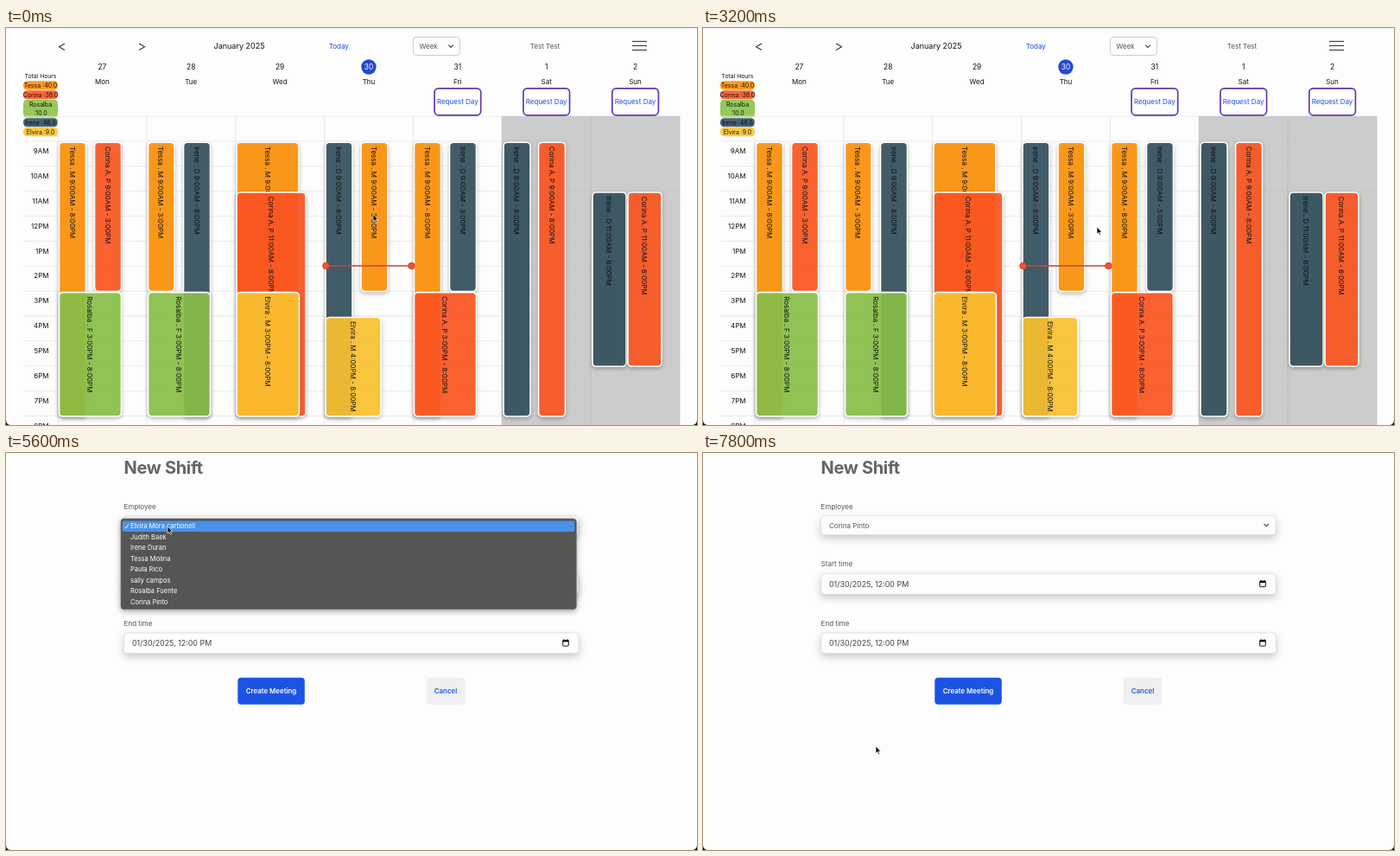
Recreate the animation shown at these times as an HTML page. Size 800 px wide and 459 px high, loop 8 s.

```html
<!DOCTYPE html>
<html lang="en">
<head>
<meta charset="utf-8">
<title>Shift calendar</title>
<style>
html, body { margin: 0; width: 100%; height: 100%; overflow: hidden; background: #fdfdfd; }
svg { display: block; width: 100%; height: 100%; font-family: Inter, "Open Sans", sans-serif; }
text { white-space: pre; }
.event { filter: drop-shadow(0 2px 2px rgba(0,0,0,.28)); }
.field { filter: drop-shadow(0 4px 4px rgba(0,0,0,.2)); }
.menu { filter: drop-shadow(0 2px 3px rgba(0,0,0,.35)); }
</style>
</head>
<body>
<svg id="stage" viewBox="0 0 800 459"></svg>
<script>
const stage = document.getElementById('stage');
const BLUE = '#1d4ed8';
const STAFF = {
  tessa: { name: 'Tessa', label: 'Tessa . M', color: '#ff9309', hours: '40.0' },
  corina: { name: 'Corina', label: 'Corina A. P', color: '#ff5722', hours: '38.0' },
  rosalba: { name: 'Rosalba', label: 'Rosalba . F', color: '#8bc34a', hours: '10.0' },
  irene: { name: 'Irene', label: 'Irene . D', color: '#34505e', hours: '46.0' },
  elvira: { name: 'Elvira', label: 'Elvira . M', color: '#ffc530', hours: '9.0' }
};
const MENU = ['Elvira Mora carbonell', 'Judith Baek', 'Irene Duran', 'Tessa Molina',
  'Paula Rico', 'sally campos', 'Rosalba Fuente', 'Corina Pinto'];
// left, width, first hour, last hour, person
const SHIFTS = [
  [61, 32, 9, 20, 'tessa'], [102, 32, 9, 15, 'corina'], [61, 73, 15, 20, 'rosalba'],
  [164, 31.5, 9, 15, 'tessa'], [205, 32, 9, 20, 'irene'], [164, 73, 15, 20, 'rosalba'],
  [266.5, 73, 9, 15, 'tessa'], [266.5, 81, 11, 20, 'corina'], [266.5, 73.5, 15, 20, 'elvira'],
  [369.5, 32, 9, 20, 'irene'], [410.5, 32, 9, 15, 'tessa'], [369.5, 65, 16, 20, 'elvira'],
  [472, 32, 9, 20, 'tessa'], [513, 32, 9, 15, 'irene'], [472, 73, 15, 20, 'corina'],
  [575.5, 32, 9, 20, 'irene'], [616, 32, 9, 20, 'corina'],
  [678.5, 40, 11, 18, 'irene'], [719.5, 40, 11, 18, 'corina']
];

const hourY = hour => 131.4 + 28.88 * (hour - 9);
const columnX = day => 60 + 102.85 * day;
const hourName = hour => (hour > 12 ? hour - 12 : hour);
const period = hour => (hour < 12 ? 'AM' : 'PM');
const clock = hour => `${hourName(hour)}:00${period(hour)}`;

const text = (x, y, value, size = 8, fill = '#111', extra = '') =>
  `<text x="${x}" y="${y}" font-size="${size}" fill="${fill}" ${extra}>${value}</text>`;
const centered = (x, y, value, size, fill, extra = '') =>
  text(x, y, value, size, fill, `text-anchor="middle" ${extra}`);
const rect = (x, y, w, h, fill, r = 0, extra = '') =>
  `<rect x="${x}" y="${y}" width="${w}" height="${h}" rx="${r}" fill="${fill}" ${extra}/>`;
const line = (x1, y1, x2, y2, color, width = 1) =>
  `<path d="M${x1} ${y1}L${x2} ${y2}" stroke="${color}" stroke-width="${width}"/>`;
const chevron = (x, y) =>
  `<path d="M${x - 2.8} ${y - 1.3}l2.8 2.8 2.8-2.8" fill="none" stroke="#444" stroke-width="1.1"/>`;

function header() {
  const arrows = [[61, 1], [161, -1]].map(([x, dir], i) =>
    `<path d="M${i ? 154 : 68} 18l${i ? 6.5 : -6.5} 3.7 ${i ? -6.5 : 6.5} 3.7" fill="none" stroke="#333" stroke-width="1.1"/>`).join('');
  const bars = [15.5, 20.5, 25.5].map(y => line(725, y, 742, y, '#444', 1.2)).join('');
  return arrows + centered(270, 24.3, 'January 2025', 9) + centered(385.3, 24, 'Today', 8, BLUE) +
    rect(471.5, 10.5, 54, 21, '#fdfdfd', 3.5, 'stroke="#ccc"') + text(478.5, 24, 'Week', 8, '#555') +
    chevron(515, 21) + centered(624, 24, 'Test Test', 8, '#555') + bars;
}

function totals() {
  let y = 61.3;
  let out = centered(40, 58.3, 'Total Hours', 6.8);
  for (const { name, color, hours } of Object.values(STAFF)) {
    const tall = name.length > 6;
    const height = tall ? 20.5 : 10.2;
    out += rect(20, y, 40, height, color, 4.5, 'fill-opacity=".9"');
    out += tall
      ? centered(40, y + 7.8, name, 7) + centered(40, y + 18.2, ':' + hours, 7)
      : centered(40, y + 7.8, `${name} :${hours}`, 7);
    y += height + .65;
  }
  return out;
}

function days() {
  const names = ['Mon', 'Tue', 'Wed', 'Thu', 'Fri', 'Sat', 'Sun'];
  const dates = [27, 28, 29, 30, 31, 1, 2];
  return names.map((name, i) => {
    const x = columnX(i) + 51.4;
    const today = i === 3;
    return (today ? `<circle cx="${x}" cy="45" r="8.7" fill="#2549d0"/>` : '') +
      centered(x, 48.1, dates[i], 8.4, today ? '#fff' : '#111') + centered(x, 65, name) +
      (i > 3 ? rect(x - 26.7, 69.8, 53.6, 31, '#fff', 4.5, 'stroke="#6337ad" stroke-width="1.7"') +
        centered(x, 88.3, 'Request Day', 8, BLUE) : '');
  }).join('');
}

function grid() {
  let out = rect(574.3, 102, 205.7, 357, '#cccccc');
  for (let hour = 8; hour <= 20; hour++) {
    const y = hourY(hour) - .4;
    out += line(20, y, 574, y, '#e6e6e6', .8) + line(574, y, 780, y, '#c5c5c5', .6);
    if (hour > 8) out += text(49.5, y + 14, hourName(hour) + period(hour), 8, '#111', 'text-anchor="end"');
  }
  for (let day = 0; day <= 7; day++)
    out += line(columnX(day), 102, columnX(day), 459, day > 4 ? '#bdbdbd' : '#e2e2e2', .8);
  return out;
}

function shift([x, width, from, to, who]) {
  const { label, color } = STAFF[who];
  const top = hourY(from);
  return `<g class="event">${rect(x + .5, top + .9, width - 1, hourY(to) - top - 1, color, 4.5,
    'fill-opacity=".9" stroke="#fff" stroke-width="1.6"')}</g>` +
    text(0, 0, `${label} ${clock(from)} - ${clock(to)}`, 8, '#111',
      `transform="translate(${x + width / 2 - 3.4} ${top + 5.5}) rotate(90)"`);
}

function nowLine() {
  const dot = x => `<circle cx="${x}" cy="275" r="3.8" fill="#f4512c" stroke="#c9402a" stroke-width=".8"/>`;
  return line(370, 275, 470, 275, '#c4473f', 1.7) + dot(370.5) + dot(469.5);
}

function form() {
  const box = (y, height) => `<g class="field">${rect(136.7, y, 526.5, height, '#fdfdfd', 3.5,
    'stroke="#dcdcdc" stroke-width=".8"')}</g>`;
  const dateField = (label, y) => text(136.6, y - 8.2, label, 8, '#555') + box(y, 23.6) +
    text(146, y + 15.4, '01/30/2025, 12:00 PM', 8.9, '#444') +
    rect(644.7, y + 8.7, 6.6, 6.4, 'none', .6, 'stroke="#111"') + rect(644.5, y + 8.2, 7, 2.2, '#111') +
    line(646, y + 7.2, 646, y + 9, '#111') + line(650, y + 7.2, 650, y + 9, '#111');
  return text(136.5, 24, 'New Shift', 20, '#636568', 'font-weight="700" letter-spacing="-.3"') +
    text(136.6, 64.6, 'Employee', 8, '#555') + box(72.6, 22) +
    text(146, 86.5, '', 8, '#555', 'id="choice"') + chevron(652.3, 83.2) +
    dateField('Start time', 139.6) + dateField('End time', 208) +
    rect(268.3, 259.8, 77.5, 31, '#1d53e3', 4) +
    centered(307, 277.9, 'Create Meeting', 7.9, '#fff', 'font-weight="600"') +
    rect(486.8, 259.8, 44.8, 31, '#eeeff1', 4) +
    centered(509, 277.9, 'Cancel', 7.9, '#1f5fe0', 'font-weight="600"');
}

function menu() {
  return `<g class="menu">${rect(133, 75.9, 527.3, 104.8, '#555554', 3.5, 'stroke="#777" stroke-width=".7"')}</g>` +
    rect(134.8, 0, 523.5, 12.5, '#4a91e9', 2, 'id="highlight"') +
    MENU.map((name, i) => text(144, 87.2 + 12.5 * i, name, 7.5, '#fff')).join('') +
    '<path d="M137.6 84.8l1.5 2 2.7-4.4" fill="none" stroke="#fff" stroke-width=".9"/>';
}

stage.innerHTML = rect(0, 0, 800, 459, '#fdfdfd') + line(0, .3, 800, .3, '#e9e9e9', .7) +
  `<g id="calendar">${header() + totals() + grid() + days() + SHIFTS.map(shift).join('') + nowLine()}</g>
   <g id="form">${form()}</g><g id="menu">${menu()}</g>
   <path d="M0 453Q0 459 6 459H0zM800 453Q800 459 794 459H800z" fill="#000"/>
   <path id="cursor" d="M0 0V8.2L1.9 6.5 3.2 9.4 4.5 8.8 3.2 6H5.8Z" fill="#000" stroke="#fff" stroke-width=".7"/>`;

const part = id => document.getElementById(id);
const [calendar, formView, menuView, choice, highlight, cursor] =
  ['calendar', 'form', 'menu', 'choice', 'highlight', 'cursor'].map(part);
const show = (node, visible) => { node.style.display = visible ? '' : 'none'; };

const LOOP = 8000, STEP = 200;
const FORM_OPENS = 3400, MENU_OPENS = 4800, BLINK = 7000, MENU_CLOSES = 7200, CHOSEN = 7400;
// time, x, y
const PATH = [[0, 425, 215.5], [1400, 456, 266], [1800, 456, 266], [2800, 456, 230], [3800, 456, 230],
  [4400, 187, 84.8], [5600, 187, 84.8], [6600, 188.3, 172], [7200, 188.3, 172], [7800, 200, 339], [8000, 200, 339]];

function pointer(time) {
  const i = PATH.findIndex(([end]) => time < end);
  const [t0, x0, y0] = PATH[i - 1], [t1, x1, y1] = PATH[i];
  const u = (time - t0) / (t1 - t0);
  const ease = u * u * (3 - 2 * u);
  return [x0 + (x1 - x0) * ease, y0 + (y1 - y0) * ease];
}

function draw(now) {
  const time = Math.floor(now % LOOP / STEP) * STEP;
  const [x, y] = pointer(time);
  const row = Math.max(0, Math.min(MENU.length - 1, Math.floor((y - 78.3) / 12.5)));
  show(calendar, time < FORM_OPENS);
  show(formView, time >= FORM_OPENS);
  show(menuView, time >= MENU_OPENS && time < MENU_CLOSES);
  show(highlight, time < BLINK);
  highlight.setAttribute('y', 78.4 + 12.5 * row);
  choice.textContent = time < CHOSEN ? MENU[0] : MENU[MENU.length - 1];
  cursor.setAttribute('transform', `translate(${x} ${y})`);
}

const start = performance.now();
function frame() {
  draw(performance.now() - start);
  requestAnimationFrame(frame);
}
frame();
</script>
</body>
</html>
```
